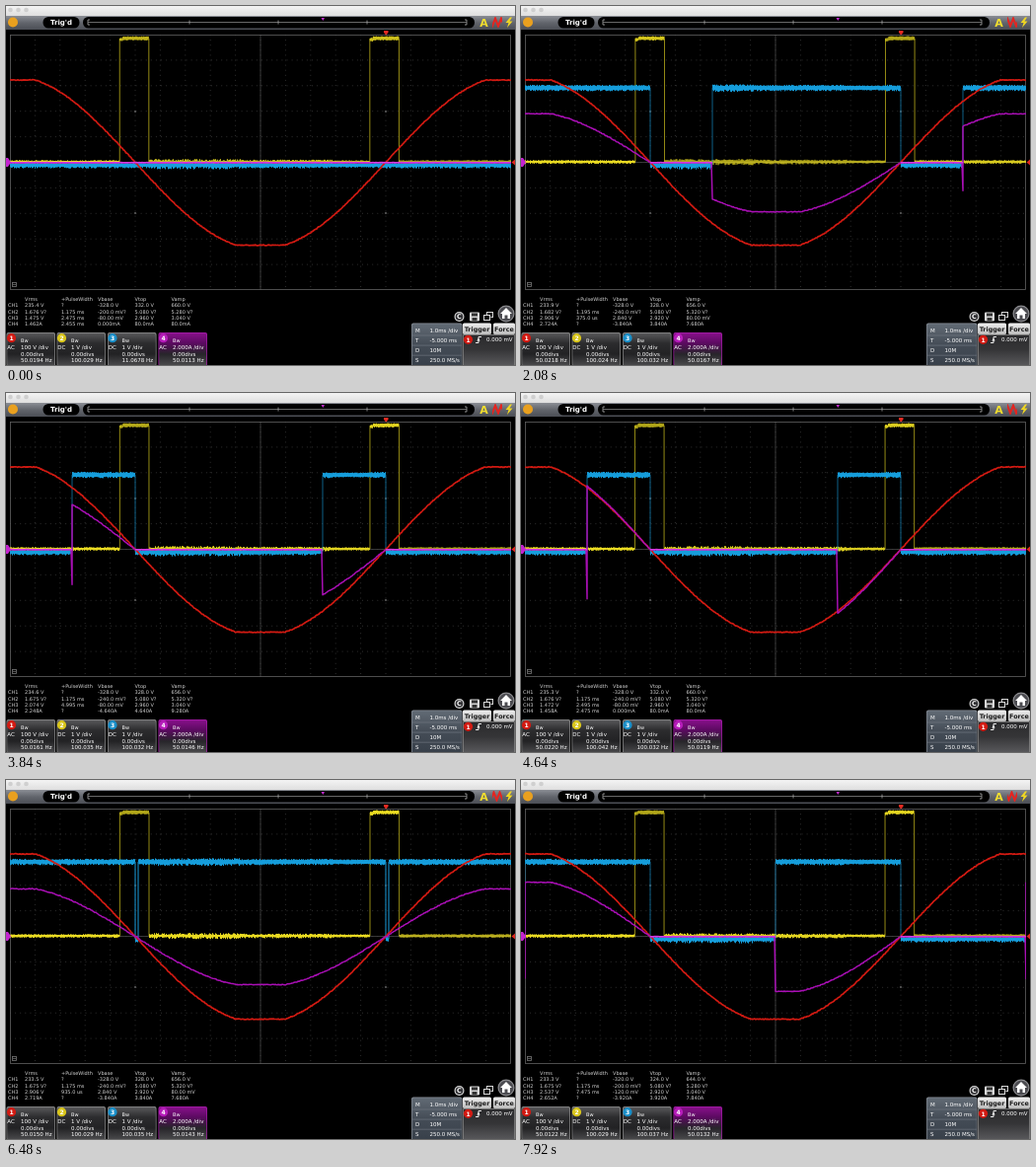
An HTML page with a canvas that plays this animation: 516 by 364 pixels, repeating every 8 s.

```html
<!DOCTYPE html>
<html lang="en">
<head>
<meta charset="utf-8">
<title>Oscilloscope</title>
<style>
html, body { margin: 0; width: 100%; height: 100%; overflow: hidden; background: #000; }
canvas { display: block; width: 516px; height: 364px; }
</style>
</head>
<body>
<canvas id="scope"></canvas>
<script>
const W = 516, H = 364, LOOP = 8000, TICK = 80;
const canvas = document.getElementById('scope');
const ctx = canvas.getContext('2d');
const ratio = window.devicePixelRatio || 1;
canvas.width = W * ratio;
canvas.height = H * ratio;

const SANS = '"DejaVu Sans", sans-serif';
const LEFT = 4, RIGHT = 512, TOP = 29, BOTTOM = 288, MID = 158.5;
const ZERO = 131, HALF = 254, DIVX = 25.4, DIVY = 25.9;
const RED = '#d21a12', YELLOW = '#eadb22', BLUE = '#159ddb', PURPLE = '#a90fb5';

// Firing delay in px after each zero crossing, with load current gain
const FULL = { delay: 3, gain: 0.58 };
const HIGH = { delay: 63, gain: 0.6 };
const MEDIUM = { delay: 127, gain: 0.73 };
const LOW = { delay: 190, gain: 1.03 };
const OFF = { delay: HALF, gain: 0 };
const STAGES = [
  [0, OFF], [880, FULL], [1920, HIGH], [2880, MEDIUM], [3840, LOW],
  [4880, OFF], [5840, FULL], [6880, HIGH], [7840, MEDIUM]
];

// ch1: rms, base, top; ch2: rms, width, base, top; ch3: the same; ch4: rms, width, base, top
const offRead = { ch1: [235.9, -324, 328], ch2: [1.676, 1.175, -0.24, 5], ch3: [0.1334, 0.575, -0.2, -0.08],
  ch4: [0.0402, 0, 0, 0.08], hz: ['50.0102', '100.037', '100.037', '49.1898'], sure: true };
const READS = [
  [0, { ch1: [235.4, -328, 332], ch2: [1.676, 1.175, -0.2, 5.08], ch3: [1.475, 2.475, -0.08, 2.96],
    ch4: [1.462, 2.455, 0, 0.08], hz: ['50.0194', '100.029', '11.0678', '50.0113'] }],
  [480, offRead],
  [1280, { ch1: [233.9, -328, 328], ch2: [1.682, 1.195, -0.24, 5.08], ch3: [2.906, 0.375, 2.84, 2.92],
    ch4: [2.724, 0, -3.84, 3.84], hz: ['50.0218', '100.024', '100.032', '50.0167'] }],
  [2320, { ch1: [234, -328, 328], ch2: [1.66, 1.155, -0.24, 5.08], ch3: [2.536, 7.495, -0.12, 2.92],
    ch4: [2.656, 0, -3.92, 4], hz: ['50.0128', '100.040', '100.032', '50.0182'] }],
  [3280, { ch1: [234.6, -328, 328], ch2: [1.675, 1.175, -0.24, 5.08], ch3: [2.074, 4.995, -0.08, 2.96],
    ch4: [2.248, 0, -4.64, 4.64], hz: ['50.0161', '100.035', '100.032', '50.0146'] }],
  [4240, { ch1: [235.3, -328, 332], ch2: [1.676, 1.175, -0.24, 5.08], ch3: [1.472, 2.495, -0.08, 2.96],
    ch4: [1.458, 2.475, 0, 0.08], hz: ['50.0220', '100.042', '100.032', '50.0119'] }],
  [5280, offRead],
  [6240, { ch1: [233.5, -328, 328], ch2: [1.675, 1.175, -0.24, 5.08], ch3: [2.906, 0.935, 2.84, 2.92],
    ch4: [2.719, 0, -3.84, 3.84], hz: ['50.0150', '100.029', '100.035', '50.0143'] }],
  [7280, { ch1: [233.3, -320, 324], ch2: [1.675, 1.175, -0.2, 5.08], ch3: [2.537, 7.475, -0.12, 2.92],
    ch4: [2.652, 0, -3.92, 3.92], hz: ['50.0122', '100.029', '100.037', '50.0132'] }]
];

// Current right after switch-on, decaying across the screen
const INRUSH = [[4, 38], [28, 61], [65, 96], [98, 132], [131, 166], [160, 200], [190, 225], [212, 239],
  [235, 246], [258, 242], [280, 236], [310, 217], [340, 195], [385, 160], [410, 140], [440, 119],
  [465, 106], [485, 99], [498, 97.5], [512, 99]];

const findIndex = (list, t) => {
  let i = list.length - 1;
  while (i > 0 && list[i][0] > t) i--;
  return i;
};

function noise(a, b) {
  const s = Math.sin(a * 12.9898 + b * 78.233) * 43758.5453;
  return s - Math.floor(s);
}

function rect(x, y, w, h, fill) {
  ctx.fillStyle = fill;
  ctx.fillRect(x, y, w, h);
}

function shade(y0, y1, ...colors) {
  const g = ctx.createLinearGradient(0, y0, 0, y1);
  colors.forEach((c, i) => g.addColorStop(i / (colors.length - 1), c));
  return g;
}

function round(x, y, w, h, r, fill) {
  ctx.beginPath();
  ctx.roundRect(x, y, w, h, r);
  ctx.fillStyle = fill;
  ctx.fill();
}

function disc(x, y, r, fill) {
  ctx.beginPath();
  ctx.arc(x, y, r, 0, 7);
  ctx.fillStyle = fill;
  ctx.fill();
}

function text(s, x, y, size, color, weight = '', align = 'left') {
  ctx.font = `${weight} ${size}px ${SANS}`;
  ctx.textAlign = align;
  ctx.fillStyle = color;
  ctx.fillText(s, x, y);
}

function line(points, color, width = 1) {
  ctx.beginPath();
  points.forEach(([x, y]) => ctx.lineTo(x, y));
  ctx.strokeStyle = color;
  ctx.lineWidth = width;
  ctx.stroke();
}

function shape(points, fill) {
  ctx.beginPath();
  points.forEach(([x, y]) => ctx.lineTo(x, y));
  ctx.fillStyle = fill;
  ctx.fill();
}

function badge(n, x, y, color) {
  disc(x, y, 4.6, color);
  text(n, x, y + 2.2, 6, '#fff', 'bold', 'center');
}

function drawHeader(tick) {
  rect(0, 0, W, 10, shade(0, 10, '#f4f4f4', '#dedede'));
  for (const x of [4.5, 12.5, 20.5]) disc(x, 4, 2.3, '#cfcfcf');
  rect(0, 10, W, 14, shade(10, 24, '#8a8d94', '#62656c', '#4b4e55'));
  disc(7, 16.5, 5, '#e9a01f');
  round(37.5, 11, 37, 11.5, 5.5, '#000');
  text("Trig'd", 56, 19.3, 7, '#fff', 'bold', 'center');
  round(78, 11, 397, 11.5, 5.5, '#000');
  line([[85, 14], [83, 14], [83, 19], [85, 19]], '#aaa', 0.8);
  line([[465, 14], [467, 14], [467, 19], [465, 19]], '#aaa', 0.8);
  line([[83, 16.5], [467, 16.5]], '#858585', 0.8);
  for (const x of [186, 276, 366]) line([[x, 14.5], [x, 18.5]], '#aaa', 0.8);
  shape([[319.5, 12], [323, 12], [321.3, 15]], '#c42bd0');

  text('A', 484.5, 21, 11, '#f2df2e', 'bold', 'center');
  ctx.save();
  ctx.beginPath();
  ctx.rect(493, 11, 10, 11);
  ctx.clip();
  const wave = [];
  for (let i = 0; i < 7; i++) wave.push([490 - tick % 4 * 1.5 + i * 3, i % 2 ? 20.5 : 12.5]);
  line(wave, '#e52420', 2);
  ctx.restore();
  shape([[511, 11.5], [506.5, 17], [509.5, 17], [508, 22], [513.5, 15.5], [510.5, 15.5], [513, 11.5]], '#f0d722');
}

function drawGrid() {
  rect(0, 24, W, H - 24, '#000');
  ctx.strokeStyle = '#3b3b3b';
  ctx.lineWidth = 0.8;
  ctx.setLineDash([1, 4.1]);
  ctx.beginPath();
  for (let i = 1; i < 20; i++) {
    const x = LEFT + i * DIVX;
    ctx.moveTo(x, TOP);
    ctx.lineTo(x, BOTTOM);
  }
  for (let j = 1; j < 10; j++) {
    const y = TOP + j * DIVY;
    ctx.moveTo(LEFT, y);
    ctx.lineTo(RIGHT, y);
  }
  ctx.stroke();
  ctx.setLineDash([]);
  line([[258, TOP], [258, BOTTOM]], '#474747', 0.8);
  line([[LEFT, MID], [RIGHT, MID]], '#474747', 0.8);
  ctx.strokeStyle = '#606060';
  ctx.strokeRect(LEFT + 0.5, TOP + 0.5, RIGHT - LEFT - 1, BOTTOM - TOP - 1);
  for (const x of [131, 385]) for (const y of [107, 210]) disc(x, y, 1.1, '#5c5c5c');
  shape([[383, 25], [387.5, 25], [387.5, 27], [385.3, 29.5], [383, 27]], '#e32a22');
  ctx.strokeStyle = '#777';
  ctx.strokeRect(6.5, 280.5, 4, 4);
  line([[7, 282.5], [10, 282.5]], '#777', 0.7);
}

// Noisy horizontal level drawn as one bar per pixel column
function level(x0, x1, y, thick, spread, color, seed) {
  ctx.fillStyle = color;
  const a = Math.max(x0, LEFT), b = Math.min(x1, RIGHT);
  for (let x = a; x < b; x++) {
    const s = x > 150 && x < 237 ? spread * 1.5 : x > 330 && x < 369 ? spread * 0.5 : spread;
    const up = noise(x, seed) * s * 0.45, down = noise(x, seed + 9.1) * s * 0.55;
    ctx.fillRect(x, y - thick / 2 - up, Math.min(1, b - x), thick + up + down);
  }
}

const mains = x => {
  const s = -88 * Math.sin(Math.PI * (x - ZERO) / HALF);
  return Math.max(-84, Math.min(83.5, s));
};

function drawMains(seed) {
  const pts = [];
  for (let x = LEFT; x <= RIGHT; x += 1) pts.push([x, MID - mains(x) + noise(x, seed) * 0.8 - 0.4]);
  line(pts, RED, 1.7);
}

function drawSync(seed) {
  const shift = noise(seed, 3) * 0.9;
  let from = LEFT;
  for (const start of [115, 368.6]) {
    const a = start + shift, b = a + 29.6;
    level(from, a, 158, 1.8, from === LEFT ? 2 : 3, YELLOW, seed);
    line([[a, 158], [a, 33]], '#a59a18', 0.9);
    level(a, a + 3, 34, 2.5, 1.5, YELLOW, seed);
    level(a + 3, b, 32.7, 2.8, 1.6, YELLOW, seed);
    line([[b, 33], [b, 158]], '#a59a18', 0.9);
    from = b;
  }
  level(from, RIGHT, 158, 1.8, 2, YELLOW, seed);
}

function drawGate(delay, seed) {
  for (const zero of [ZERO - HALF, ZERO, ZERO + HALF]) {
    const on = zero + delay, end = zero + HALF;
    level(zero, on, 161.4, 3, 3.4, BLUE, seed + 4);
    if (delay >= HALF) continue;
    level(on, end, 83, 3.6, 3, BLUE, seed + 5);
    const w = delay < 10 ? 1.3 : 0.8;
    for (const x of [on, end]) if (x >= LEFT - 1 && x < RIGHT) line([[x, 83], [x, 161]], '#1379aa', w);
  }
}

function drawCurrent(stage, gain, seed) {
  const pts = [];
  for (let x = LEFT; x <= RIGHT; x++) {
    const phase = ((x - ZERO) % HALF + HALF) % HALF;
    const on = phase >= stage.delay;
    const y = MID + 0.3 - (on ? mains(x) * gain : 0);
    if (on && phase < stage.delay + 1 && stage.delay > 10 && mains(x) > 0) {
      pts.push([x, MID + mains(x) * gain * 0.78]);
    }
    pts.push([x, y + noise(x, seed + 2) * 0.8 - 0.4]);
  }
  line(pts, PURPLE, 1.5);
  for (const zero of [ZERO - HALF, ZERO, ZERO + HALF]) {
    if (stage.delay < 10) continue;
    const a = Math.max(LEFT, zero), b = Math.min(RIGHT, zero + stage.delay);
    if (b > a) line([[a, MID + 0.3], [b, MID + 0.3]], '#d43be0', 1.4);
  }
}

function drawInrush() {
  ctx.beginPath();
  ctx.moveTo(...INRUSH[0]);
  for (let i = 1; i < INRUSH.length - 1; i++) {
    const [x, y] = INRUSH[i], [nx, ny] = INRUSH[i + 1];
    ctx.quadraticCurveTo(x, y, (x + nx) / 2, (y + ny) / 2);
  }
  ctx.lineTo(...INRUSH[INRUSH.length - 1]);
  ctx.strokeStyle = PURPLE;
  ctx.lineWidth = 1.7;
  ctx.stroke();
}

function drawTraces(t, tick) {
  const i = findIndex(STAGES, t);
  const [start, stage] = STAGES[i];
  const before = i ? STAGES[i - 1][1].gain : stage.gain;
  const age = t - start;
  const gain = stage === FULL ? stage.gain
    : stage.gain + (before - stage.gain) * Math.exp(-age / 130);
  ctx.save();
  ctx.beginPath();
  ctx.rect(LEFT, TOP, RIGHT - LEFT, BOTTOM - TOP);
  ctx.clip();
  ctx.lineJoin = 'round';
  drawSync(tick);
  drawGate(stage.delay, tick);
  drawMains(tick);
  if (stage === FULL && age < 2 * TICK) drawInrush();
  else drawCurrent(stage, gain, tick);
  ctx.restore();
  shape([[0, 154], [2, 154], [5, 158.5], [2, 163], [0, 163]], '#c423cf');
  shape([[516, 155.5], [512.5, 158.5], [516, 161.5]], '#e0281f');
}

const volts = v => Math.abs(v) < 1 ? (v * 1000).toPrecision(4) + ' mV' : v.toFixed(3) + ' V';
const mains1 = v => v.toFixed(1) + ' V';
const amps = a => !a ? '0.000mA' : Math.abs(a) < 1 ? (a * 1000).toPrecision(3) + 'mA' : a.toFixed(3) + 'A';
const width = w => !w ? '?' : w < 1 ? (w * 1000).toFixed(1) + ' us' : w.toFixed(3) + ' ms';

function drawReadings(r) {
  const cols = [19, 56, 93, 130.5, 167.5];
  const row = (cells, y) => cells.forEach((s, i) => text(s, cols[i], y, 5, '#d4d4d4'));
  const values = ([rms, w, base, top], unit, mark = '') => [unit(rms) + mark, width(w),
    unit(base) + mark, unit(top) + mark, unit(top - base) + mark];
  const [rms, base, top] = r.ch1;
  row(['Vrms', '+PulseWidth', 'Vbase', 'Vtop', 'Vamp'], 299);
  [
    values([rms, 0, base, top], mains1),
    values(r.ch2, volts, r.sure ? '' : '?'),
    values(r.ch3, volts),
    values(r.ch4, amps)
  ].forEach((cells, i) => {
    const y = 305.4 + i * 6.3;
    text('CH' + (i + 1), 2, y, 5, '#d4d4d4');
    row(cells, y);
  });
}

function drawChannels(hz) {
  const info = [[0.5, 'AC', '100 V /div', RED], [51.5, 'DC', '1 V /div', '#d9c61c'],
    [103, 'DC', '1 V /div', '#1a8fc9'], [154.5, 'AC', '2.000A /div', '#b51cb9']];
  info.forEach(([x, mode, scale, color], i) => {
    const active = i === 3;
    round(x, 331, 49.5, 34, 2, active ? '#a51aa8' : '#8b8b8b');
    round(x + 0.7, 331.7, 48.1, 33, 2, active
      ? shade(331, 364, '#8a118d', '#5b0a60', '#27252a', '#48484a')
      : shade(331, 364, '#5b5b5d', '#2c2c2e', '#222224', '#48484a'));
    badge(i + 1, x + 5, 336.7, color);
    text(mode, x + 0.8, 348, 5.5, '#fff');
    text('Bw', x + 14.5, 341, 5, '#fff');
    text(scale, x + 14.5, 348, 5.5, '#fff');
    text('0.00divs', x + 14.5, 354.6, 5.5, '#fff');
    text(hz[i] + ' Hz', x + 14.5, 361.4, 5.5, '#fff');
  });
}

function drawIcons() {
  disc(459.5, 315, 5, '#d8d8d8');
  disc(459.5, 315, 3.8, '#303033');
  text('C', 459.5, 317.4, 6.5, '#fff', 'bold', 'center');
  round(470, 310.5, 10, 9, 1, '#d8d8d8');
  rect(472, 311.5, 6, 3, '#333');
  rect(472.5, 316, 5, 3, '#333');
  ctx.strokeStyle = '#d8d8d8';
  ctx.lineWidth = 1;
  ctx.strokeRect(487.5, 310.5, 6, 5);
  rect(484.5, 313.5, 7, 6, '#111');
  ctx.strokeRect(484.5, 313.5, 6, 5);
  disc(507, 312, 8.5, '#8d8d90');
  disc(507, 312, 7.3, '#4b4b50');
  shape([[507, 306], [513, 312], [511, 312], [511, 317], [508.5, 317], [508.5, 313.5], [505.5, 313.5],
    [505.5, 317], [503, 317], [503, 312], [501, 312]], '#fff');
}

function drawTimebase() {
  round(411, 321.5, 51.5, 44, 2, '#858c95');
  round(411.7, 322.2, 50.1, 43, 2, shade(322, 364, '#626b75', '#454d57', '#38404a'));
  [['M', '1.0ms /div'], ['T', '-5.000 ms'], ['D', '10M'], ['S', '250.0 MS/s']].forEach(([k, v], i) => {
    const y = 330.7 + i * 10.1;
    text(k, 415, y, 5.5, '#fff');
    text(v, 429.5, y, 5.5, '#fff');
    if (i) line([[412, y - 6.8], [462, y - 6.8]], '#737b85', 0.6);
  });
}

function drawTrigger() {
  round(463, 333, 53, 32, 1, '#8b8b8b');
  round(463.7, 333.7, 51.6, 31, 1, shade(333, 364, '#2a2a2c', '#353537', '#57575a'));
  for (const [s, x, w] of [['Trigger', 463, 29], ['Force', 494, 22]]) {
    round(x, 321.5, w, 11.5, 1.5, shade(321, 333, '#f1f1f1', '#bcbcbc'));
    text(s, x + w / 2, 329.8, 6.4, '#1c1c1c', 'bold', 'center');
  }
  badge(1, 468.5, 338.3, RED);
  line([[476, 341.5], [479, 341.5], [479, 335.5], [482, 335.5]], '#fff', 0.9);
  shape([[477.4, 339.5], [480.6, 339.5], [479, 336.8]], '#fff');
  text('0.000 mV', 487, 340.3, 5.5, '#fff');
}

function draw(time) {
  const tick = Math.floor((time % LOOP) / TICK);
  const t = tick * TICK;
  const reading = READS[findIndex(READS, t)][1];
  ctx.setTransform(ratio, 0, 0, ratio, 0, 0);
  ctx.textBaseline = 'alphabetic';
  drawGrid();
  drawHeader(tick);
  drawTraces(t, tick);
  drawReadings(reading);
  drawChannels(reading.hz);
  drawIcons();
  drawTimebase();
  drawTrigger();
}

const began = performance.now();
function loop() {
  draw(performance.now() - began);
  requestAnimationFrame(loop);
}
loop();
</script>
</body>
</html>
```
